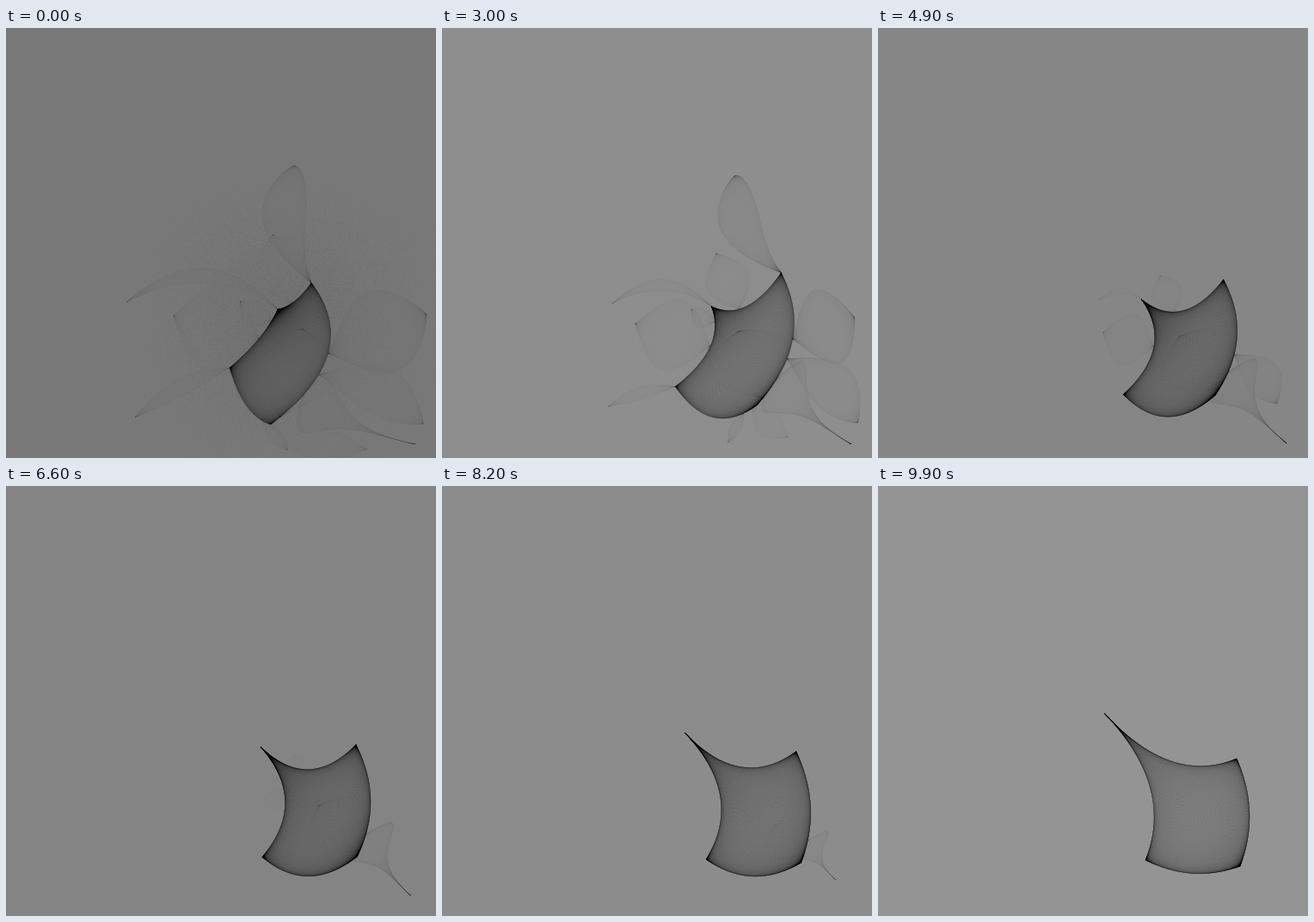
Animation, 500 px wide and 500 px high, one loop 10 s. Source, as an HTML page with a canvas:

```html
<!DOCTYPE html>
<html lang="en">
<head>
<meta charset="utf-8">
<title>Folding veil</title>
<style>
  html, body { margin: 0; width: 100%; height: 100%; overflow: hidden; background: #787878; }
  canvas { display: block; width: 500px; height: 500px; }
</style>
</head>
<body>
<canvas id="stage" width="500" height="500"></canvas>
<script>
const SIZE = 500, STEPS = 100, STEP_MS = 100;
const ctx = document.getElementById('stage').getContext('2d');
const image = ctx.createImageData(SIZE, SIZE);
const pixels = new Uint32Array(image.data.buffer);
const density = new Float32Array(SIZE * SIZE);

const clamp = v => Math.min(1, Math.max(0, v));
const smooth = v => { v = clamp(v); return v * v * (3 - 2 * v); };
const mix = (a, b, f) => a + (b - a) * f;
const mixPoint = (a, b, f) => [mix(a[0], b[0], f), mix(a[1], b[1], f)];

// Grey level of the empty stage: [step, level].
const backdrop = [[0, 120], [19, 130], [36, 149], [49, 134], [66, 132], [82, 140], [99, 148]];

function backdropAt(step) {
  const n = Math.max(1, backdrop.findIndex(k => k[0] >= step));
  const [a, b] = [backdrop[n - 1], backdrop[n]];
  return mix(a[1], b[1], (step - a[0]) / (b[0] - a[0]));
}

// Four drifting corners and four bowed sides; returns (s, t) in [-1, 1]² -> [x, y].
function bodyAt(time) {
  const rest = 1 - time, pull = time ** 2.4, jolt = rest ** 8;
  const nw = [316 - 53 * pull, 327 - 63 * pull];
  const ne = [387 + 30 * time - 32 * jolt, 268 + 49 * time + 28 * jolt];
  const se = [421 - 113 * rest ** 2,
              461 - 34 * smooth(time * 2) + 15 * smooth(time * 2 - 1)];
  const sw = [260 + 51 * smooth(time), 435 - 40 * rest ** 2.2];
  const arch = 29 - 23 * rest ** 2.5;
  const side = (a, b, dx, dy) => [(a[0] + b[0]) / 2 + dx, (a[1] + b[1]) / 2 + dy];
  const n = side(nw, ne, 0, arch), w = side(nw, sw, arch, 0);
  const e = side(ne, se, 13 + 30 * rest ** 2, 0);
  const so = side(sw, se, -4 * rest, 12 + 14 * Math.sin(Math.PI * time ** .8));
  return (s, t) => {
    const l = 1 - s, r = 1 + s, u = 1 - t, d = 1 + t;
    const a = l * u * (-s - t - 1) / 4, b = r * u * (s - t - 1) / 4;
    const c = r * d * (s + t - 1) / 4, f = l * d * (t - s - 1) / 4;
    const g = l * r * u / 2, h = l * r * d / 2, i = u * d * r / 2, j = u * d * l / 2;
    const sum = k => a * nw[k] + b * ne[k] + c * se[k] + f * sw[k]
                   + g * n[k] + h * so[k] + i * e[k] + j * w[k];
    return [sum(0), sum(1)];
  };
}

// Petals hang on the body at `root` and shrink back into it by the end of `life`.
// `belly` sets where they are widest: below 1 near the root, above 1 near the tip.
const petals = [
  { root: [1, -1],    tip: [335, 160], bend: -.3, width: 26, belly: 1.6, life: 48,  pace: 5,   weight: .08 },
  { root: [-1, -1],   tip: [140, 319], bend: .4,  width: 9,  belly: 1,   life: 62,  pace: 1.5, weight: .07 },
  { root: [-1, 1],    tip: [150, 453], bend: .1,  width: 10, belly: 1,   life: 50,  pace: 2,   weight: .06 },
  { root: [-1, 0],    tip: [195, 335], bend: 0,   width: 52, belly: 1,   life: 75,  pace: 1.5, weight: .02 },
  { root: [-1, -.6],  tip: [272, 318], bend: -.2, width: 17, belly: 1,   life: 48,  pace: 2,   weight: .08 },
  { root: [-.2, -1],  tip: [310, 240], bend: 0,   width: 32, belly: 1,   life: 75,  pace: 1.5, weight: .025 },
  { root: [1, 0],     tip: [489, 333], bend: 0,   width: 49, belly: 1.2, life: 46,  pace: 5,   weight: .05 },
  { root: [1, .3],    tip: [485, 460], bend: -.2, width: 28, belly: 1.2, life: 60,  pace: 6,   weight: .04 },
  { root: [1, .6],    tip: [476, 484], bend: .1,  width: 37, belly: .3,  life: 97,  pace: 6,   weight: .04 },
  { root: [.9, 1],    tip: [420, 490], bend: .1,  width: 20, belly: 1,   life: 45,  pace: 3,   weight: .02 },
  { root: [.7, 1],    tip: [328, 491], bend: 0,   width: 8,  belly: 1,   life: 44,  pace: 4,   weight: .08 },
  { root: [1, .9],    tip: [345, 350], bend: 0,   width: 52, belly: 1.3, life: 100, pace: 3,   weight: .04 }
];

function petalShape({ root, tip, bend, width, belly }, body, gone) {
  const a = body(...root), b = mixPoint(tip, a, gone);
  const dx = b[0] - a[0], dy = b[1] - a[1], length = Math.hypot(dx, dy) || 1;
  const mid = [(a[0] + b[0]) / 2 - dy * bend, (a[1] + b[1]) / 2 + dx * bend];
  const nx = -dy / length, ny = dx / length, half = width * (1 - gone) ** .7;
  return {
    area: length * half * 1.3,
    at(s, t) {
      const q = (s + 1) / 2, p = 1 - q;
      const w = t * half * Math.max(0, Math.sin(Math.PI * q ** belly)) ** (1 / belly);
      return [p * p * a[0] + 2 * p * q * mid[0] + q * q * b[0] + nx * w,
              p * p * a[1] + 2 * p * q * mid[1] + q * q * b[1] + ny * w];
    }
  };
}

function add(x, y, mass) {
  const px = Math.floor(x), py = Math.floor(y);
  if (px >= 0 && py >= 0 && px < SIZE && py < SIZE) density[py * SIZE + px] += mass;
}

// Scatter evenly spread angles; their cosines crowd the points towards the rims.
function scatter(at, area, weight, perPixel, trim) {
  const count = Math.round(area * perPixel), mass = weight * area / (count * .405);
  const span = Math.PI * (1 - 2 * trim), first = Math.PI * trim, grow = 1 / Math.cos(first);
  const spread = v => grow * Math.cos(first + span * (v % 1));
  for (let i = 0; i < count; i++) {
    const [x, y] = at(spread(i * .7548776662466927), spread(i * .5698402909980532));
    add(x, y, mass);
  }
}

function drawHaze(weight) {
  let seed = 7;
  const rnd = () => (seed = (seed * 16807) % 2147483647) / 2147483647;
  const bell = () => (rnd() + rnd() + rnd()) / 1.5 - 1;
  for (let i = 0; i < 120000; i++) {
    add(325 + bell() * 185, 340 + bell() * 185, weight);
  }
}

function draw(step) {
  const time = step / (STEPS - 1), trim = .05 * (1 - time);
  const body = bodyAt(time);
  density.fill(0);
  scatter(body, 14500, .6 + .35 * smooth(time * 2.5), 14, trim);

  const clear = .35 + .65 * smooth(step / 16);
  for (const petal of petals) {
    const gone = clamp(step / petal.life) ** petal.pace;
    if (gone >= 1) continue;
    const shape = petalShape(petal, body, gone);
    scatter(shape.at, shape.area, petal.weight * clear * (1 - gone), 8, .04);
  }

  const fog = (1 - clamp(step / 46)) ** 2;
  if (fog > 0) drawHaze(.028 * fog);

  const base = backdropAt(step);
  for (let i = 0; i < density.length; i++) {
    const v = Math.max(0, Math.round(base - 25 * density[i] ** .6));
    pixels[i] = (255 << 24 | v << 16 | v << 8 | v) >>> 0;
  }
  ctx.putImageData(image, 0, 0);
}

let shown = -1;
const start = performance.now();
function tick() {
  const step = Math.floor(Math.max(0, performance.now() - start) / STEP_MS) % STEPS;
  if (step !== shown) draw(shown = step);
  requestAnimationFrame(tick);
}
tick();
</script>
</body>
</html>
```
